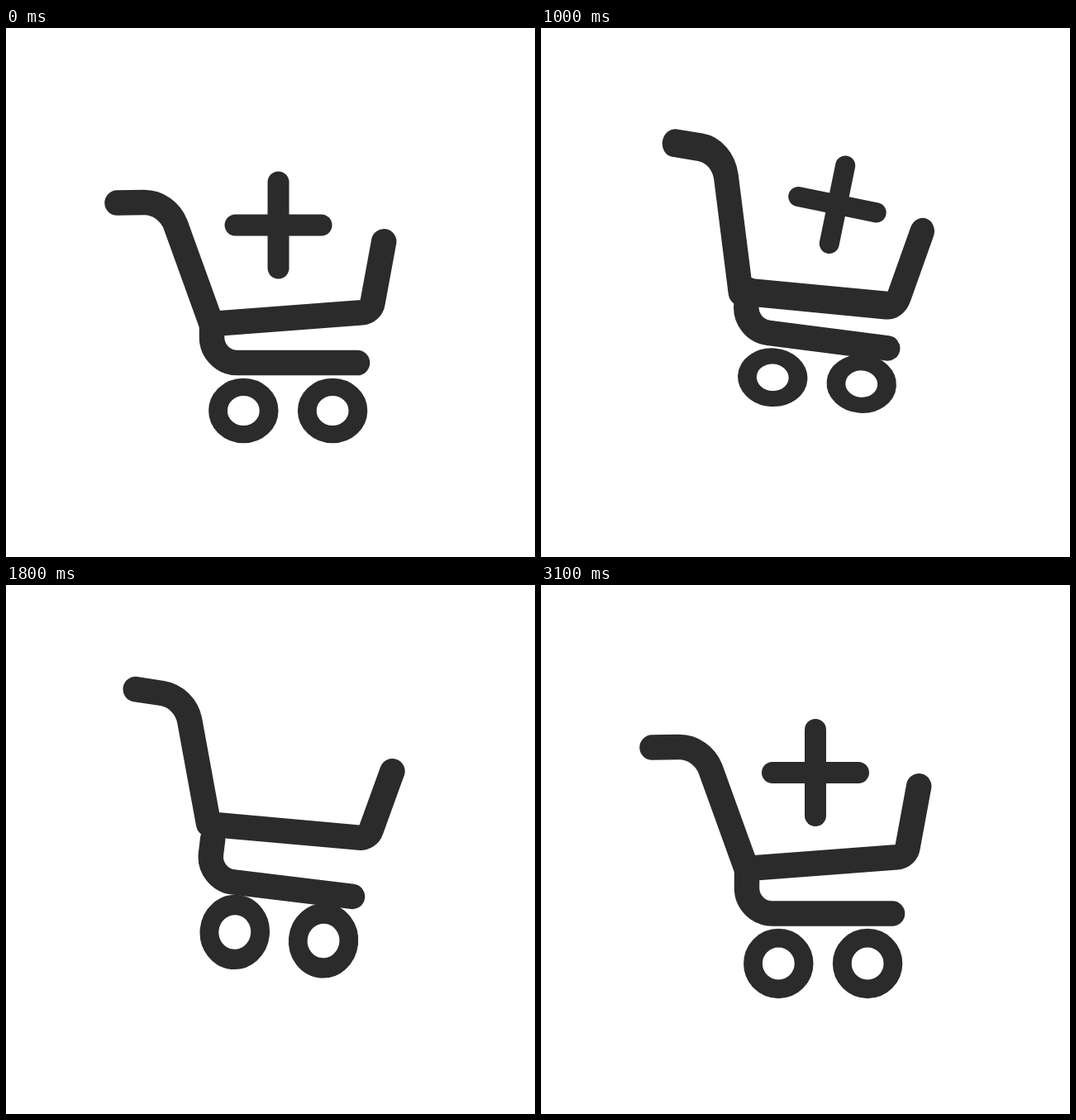
Recreate the animation shown at these times as an HTML page. Size 640 by 640 pixels, loop 3200 ms.

```html
<!DOCTYPE html>
<html lang="en">
<head>
<meta charset="utf-8">
<title>Add to cart</title>
<style>
  html, body { margin: 0; width: 100%; height: 100%; overflow: hidden; background: #fff; }
  svg { display: block; width: 100%; height: 100%; }
  g { fill: none; stroke: #2b2b2b; stroke-linecap: round; stroke-linejoin: round; }
</style>
</head>
<body>
<svg viewBox="0 0 640 640">
  <g id="basket" stroke-width="30.5">
    <path d="M134.5 196.6L167 196.1C184 196 199 207 205 222.5L248.5 343L430.5 329.3C437.5 328.8 442.5 324 443.5 317.5L457.2 243.3"/>
  </g>
  <g id="rail" stroke-width="30.5">
    <path d="M249 349V366.5A31 31 0 0 0 280 397.5H425"/>
  </g>
  <g id="wheels" stroke-width="22.8">
    <circle cx="287.3" cy="458" r="30.8"/>
    <circle cx="395.1" cy="458" r="30.8"/>
  </g>
  <g id="plus" stroke-width="26">
    <path d="M-52 0H52"/>
    <path d="M0 -52V52"/>
  </g>
</svg>
<script>
const LOOP = 3200, STEP = 100;
const pivots = { basket: [295.5, 270], rail: [337, 373], wheels: [341.2, 458] };

// Key poses of the cart: only what differs from rest
const rest = { x: 0, y: 0, tilt: 0, sx: 1, sy: 1 };
const sag = { at: 0, basket: { y: 15 }, rail: { y: 7.6 }, wheels: { y: 5, sy: 0.929 } };
const crouch = {
  at: 700,
  basket: { y: 17.2, tilt: 2.6, sx: 0.955, sy: 1.18 },
  rail: { y: 14.9 },
  wheels: { y: 7.8, sy: 0.888 }
};
const leap = {
  at: 1200,
  basket: { x: 8.4, y: -43.7, tilt: 14.5, sx: 0.982, sy: 1.07 },
  rail: { x: -3, y: -40, tilt: 11.2 },
  wheels: { x: -11, y: -52, tilt: 6.4, sy: 0.81 }
};
const hang = {
  at: 1800,
  basket: { x: 8, y: -45, tilt: 9.46 },
  rail: { x: -2.4, y: -31, tilt: 6.9 },
  wheels: { x: -10.8, y: -32.8, tilt: 5.6, sy: 1.07 }
};
const land = { at: 2200, basket: { y: -7.5, tilt: -3.72 }, rail: { y: -8 }, wheels: { sy: 1.107 } };
const bounce = { at: 2700, basket: { y: 2, tilt: 1.07 }, rail: { y: -4 }, wheels: { sy: 0.929 } };
const poses = [sag, crouch, leap, hang, land, bounce, { at: 3000 }];

const mix = (a, b, u) => a + (b - a) * u;
const span = (t, from, to) => Math.min(1, Math.max(0, (t - from) / (to - from)));
const ease = u => (1 - Math.cos(Math.PI * u)) / 2;
const glide = (t, from, to) => ease(span(t, from, to));
const arc = (t, from, to) => Math.sin(Math.PI * span(t, from, to));

function place(id, { x, y, tilt, sx, sy }, alpha = 1) {
  const [px, py] = pivots[id] ?? [0, 0];
  const el = document.getElementById(id);
  el.setAttribute('transform',
    `translate(${px + x} ${py + y}) rotate(${tilt}) scale(${sx} ${sy}) translate(${-px} ${-py})`);
  for (const shape of el.children) shape.setAttribute('opacity', alpha);
}

function drawCart(t) {
  const next = Math.max(1, poses.findIndex(p => p.at > t));
  const [a, b] = t < 3000 ? [poses[next - 1], poses[next]] : poses.slice(-2);
  const u = glide(t, a.at, b.at);
  const sway = 6 * arc(t, 0, crouch.at) - 10 * arc(t, leap.at, hang.at);
  for (const id in pivots) {
    const from = { ...rest, ...a[id] }, to = { ...rest, ...b[id] };
    const pose = {};
    for (const k in rest) pose[k] = mix(from[k], to[k], u);
    pose.y += sway;
    place(id, pose);
  }
}

function drawPlus(t) {
  if (t < 2000) {
    // Sinks into the basket, then is thrown out to the upper right
    const sink = glide(t, 0, 700), fly = span(t, 700, 1520);
    const size = 1 - 0.2 * fly;
    place('plus', {
      x: 329.5 - 13 * sink + 256.5 * fly ** 1.8,
      y: 238.5 + 43 * sink - 229.5 * ease(fly),
      tilt: -11.4 * sink + 62.9 * fly,
      sx: size, sy: size
    }, 1 - span(t, 1400, 1600));
  } else {
    // Drops back in and rebounds
    const y = 100.5 + 152 * glide(t, 2200, 2700) - 33 * glide(t, 2700, 2950) + 7.5 * glide(t, 2950, 3100);
    place('plus', { ...rest, x: 332, y }, span(t, 2130, 2390));
  }
}

const start = performance.now();

function tick() {
  const now = (performance.now() - start) % LOOP;
  const t = Math.floor(now / STEP) * STEP;
  drawCart(t);
  drawPlus(t);
  requestAnimationFrame(tick);
}
tick();
</script>
</body>
</html>
```
